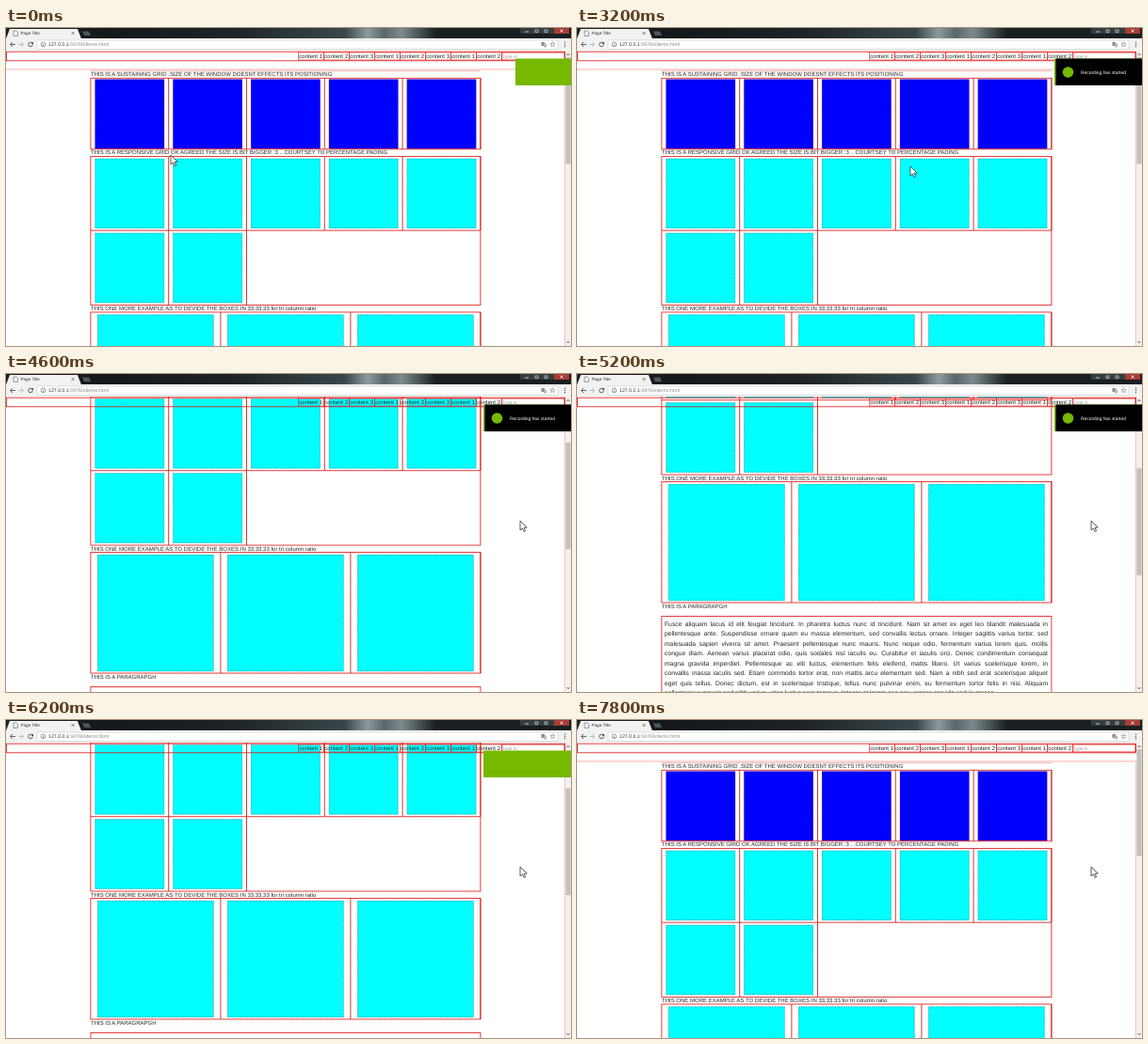
Animation, 600 px wide and 338 px high, one loop 8000 ms. Source, as an HTML page with a canvas:

```html
<!DOCTYPE html>
<html lang="en">
<head>
<meta charset="utf-8">
<title>Page Title</title>
<style>
html, body { margin: 0; width: 100%; height: 100%; overflow: hidden; background: #fff; }
canvas { display: block; }
</style>
</head>
<body>
<canvas id="stage" width="600" height="338"></canvas>
<script>
const ctx = document.getElementById('stage').getContext('2d');
ctx.textRendering = 'geometricPrecision';

const LOOP = 8000, STEP = 200, NOTCH = 37.5;
const RED = '#e01c1c', CYAN = '#00ffff', BLUE = '#0000ff', GREEN = '#76b900';
const LEFT = 89.9, RIGHT = 503.9;

// Keyframes: time, value...
const cursorKeys = [[0, 175, 135], [200, 175, 135], [1200, 281, 103], [1800, 281, 103],
  [3200, 354, 147], [3800, 546, 156]];
const scrollKeys = [[3800, 0], [4600, 112.5], [5400, 187.5], [5600, 187.5], [6600, 37.5], [7000, 0]];
const greenKeys = [[0, 541], [200, 507], [6200, 507], [6400, 600]];
const blackKeys = [[200, 600], [600, 508.5], [5800, 508.5], [6200, 600]];

const paragraph = [
  'Fusce aliquam lacus id elit feugiat tincidunt. In pharetra luctus nunc id tincidunt. Nam sit amet ex eget leo blandit malesuada in',
  'pellentesque ante. Suspendisse ornare quam eu massa elementum, sed convallis lectus ornare. Integer sagittis varius tortor, sed',
  'malesuada sapien viverra sit amet. Praesent pellentesque nunc mauris. Nunc neque odio, fermentum varius lorem quis, mollis',
  'congue diam. Aenean varius placerat odio, quis sodales nisl iaculis eu. Curabitur et iaculis orci. Donec condimentum consequat',
  'magna gravida imperdiet. Pellentesque ac elit luctus, elementum felis eleifend, mattis libero. Ut varius scelerisque lorem, in',
  'convallis massa iaculis sed. Etiam commodo tortor erat, non mattis arcu elementum sed. Nam a nibh sed erat scelerisque aliquet',
  'eget quis tellus. Donec dictum, est in scelerisque tristique, tellus nunc pulvinar enim, eu fermentum tortor felis in nisi. Aliquam',
  'pellentesque mauris sed nibh varius, vitae luctus sem tempus. Integer at lorem nec arcu ornare gravida sed in massa.'
];

function valueAt(keys, t) {
  if (t <= keys[0][0]) return keys[0].slice(1);
  for (let i = 1; i < keys.length; i++) {
    const [a, b] = [keys[i - 1], keys[i]];
    if (t <= b[0]) {
      const p = (t - a[0]) / (b[0] - a[0]);
      return a.slice(1).map((v, j) => v + (b[j + 1] - v) * p);
    }
  }
  return keys[keys.length - 1].slice(1);
}

function fill(x, y, w, h, color) {
  ctx.fillStyle = color;
  ctx.fillRect(x, y, w, h);
}

function path(points, color, width = .85, closed = false) {
  ctx.beginPath();
  points.forEach(([x, y]) => ctx.lineTo(x, y));
  if (closed) ctx.closePath();
  ctx.strokeStyle = color;
  ctx.lineWidth = width;
  ctx.stroke();
}

const line = (x1, y1, x2, y2, color = RED, width = .85) => path([[x1, y1], [x2, y2]], color, width);

function frame(x1, y1, x2, y2, color = RED, width = .85) {
  ctx.strokeStyle = color;
  ctx.lineWidth = width;
  ctx.strokeRect(x1, y1, x2 - x1, y2 - y1);
}

function text(str, x, y, size = 6, color = '#262626') {
  ctx.font = `${size}px "Liberation Sans", Arial, sans-serif`;
  ctx.fillStyle = color;
  ctx.fillText(str, x, y);
}

function disc(x, y, r, color) {
  ctx.beginPath();
  ctx.arc(x, y, r, 0, 7);
  ctx.fillStyle = color;
  ctx.fill();
}

// One row of bordered cells, each holding an inset coloured box.
function row(top, bottom, columns, count, inset, boxTop, boxBottom, color) {
  const cell = (RIGHT - LEFT) / columns;
  for (let i = 0; i < count; i++) {
    const x = LEFT + i * cell, x1 = x + inset, x2 = x + cell - inset;
    fill(x1, boxTop, x2 - x1, boxBottom - boxTop, color);
    ctx.setLineDash([1.5, 1]);
    frame(x1 + .3, boxTop + .3, x2 - .3, boxBottom - .3, 'rgba(170, 40, 60, .65)', .6);
    ctx.setLineDash([]);
    line(x + cell, top, x + cell, bottom, '#c01818');
  }
}

function drawParagraph(y) {
  ctx.font = '6.75px "Liberation Sans", Arial, sans-serif';
  paragraph.forEach((str, i) => {
    const gaps = str.split(' ').length - 1;
    const last = i === paragraph.length - 1;
    ctx.wordSpacing = '0px';
    if (!last) ctx.wordSpacing = (407 - ctx.measureText(str).width) / gaps + 'px';
    text(str, 93, y + i * 10.5, 6.75);
  });
  ctx.wordSpacing = '0px';
}

function drawPage(scroll) {
  ctx.save();
  ctx.beginPath();
  ctx.rect(0, 24, 594, 314);
  ctx.clip();
  ctx.translate(0, -scroll);

  line(0, 44, 594, 44, '#ff9c9c');
  line(593.5, 44, 593.5, 800, '#ffb4b4');
  line(LEFT, 45.7, RIGHT, 45.7, '#dc9c9c', .7);

  text('THIS IS A SUSTAINING GRID .SIZE OF THE WINDOW DOESNT EFFECTS ITS POSITIONING', 90, 51.3);
  row(53, 129, 5, 5, 4.6, 54.5, 128.5, BLUE);
  frame(LEFT, 53.3, RIGHT, 128.8);

  text('THIS IS A RESPONSIVE GRID OK AGREED THE SIZE IS BIT BIGGER :3 .. COURTSEY TO PERCENTAGE PADING', 90, 134.3);
  row(136.5, 215, 5, 5, 4.6, 138.8, 213, CYAN);
  row(215, 294.5, 5, 2, 4.6, 217.8, 292.2, CYAN);
  frame(LEFT, 136.5, RIGHT, 294.5);
  line(LEFT, 215.2, RIGHT, 215.2);

  text('THIS ONE MORE EXAMPLE AS TO DEVIDE THE BOXES IN 33.33.33 for tri column ratio', 90, 300.2);
  row(302, 430.5, 3, 3, 7.3, 304.5, 428.6, CYAN);
  frame(LEFT, 302, RIGHT, 430.5);

  text('THIS IS A PARAGRAPGH', 90, 436.3);
  frame(LEFT, 445, RIGHT, 545);
  drawParagraph(455.3);
  ctx.restore();
}

function drawMenu() {
  frame(.5, 25.2, 593.5, 34.8);
  for (let i = 0; i < 8; i++) {
    const x = 310.3 + i * 27;
    frame(x, 26, x + 27, 34, RED, .6);
    text('content ' + (i % 3 + 1), x + 1, 32);
  }
  fill(527, 26.5, 66, 7, '#fff');
  frame(526.7, 26, 593, 34);
  text('type in', 528, 32, 5, '#999');
}

function drawScrollbar(scroll) {
  fill(594, 24, 6, 314, '#f1f1f1');
  fill(594.5, 31 + scroll * .37, 5, 113.5, '#c1c1c1');
  path([[595.5, 29], [597, 27.3], [598.5, 29]], '#505050', .9);
  path([[595.5, 333], [597, 334.7], [598.5, 333]], '#505050', .9);
}

function drawBrowser() {
  const glass = ctx.createLinearGradient(0, 0, 600, 0);
  [[0, '#1c2224'], [.18, '#14181a'], [.4, '#1d2326'], [.5, '#2c3538'], [.6, '#39464a'],
   [.64, '#8c9a9d'], [.67, '#5a676a'], [.7, '#7d8a8d'], [.76, '#1a2022'], [1, '#1a2022']]
    .forEach(([at, color]) => glass.addColorStop(at, color));
  fill(0, 0, 600, 12, glass);
  fill(0, 11, 600, 13, '#f2f2f2');

  // Tab
  ctx.beginPath();
  [[0, 11.5], [4, 1], [76, 1], [80, 11.5]].forEach(p => ctx.lineTo(...p));
  ctx.fillStyle = '#f2f2f2';
  ctx.fill();
  path([[8, 3], [11, 3], [12.5, 4.5], [12.5, 8.5], [8, 8.5]], '#777', .7, true);
  text('Page Title', 15.5, 7.3, 4.6, '#333');
  line(69.5, 4, 72.5, 7, '#666', .8);
  line(72.5, 4, 69.5, 7, '#666', .8);
  ctx.beginPath();
  [[81, 3.5], [88, 3.5], [90, 8], [83, 8]].forEach(p => ctx.lineTo(...p));
  ctx.fillStyle = '#4d585b';
  ctx.fill();

  // Window buttons
  fill(546, 0, 36, 6, '#343c3f');
  fill(582, 0, 16, 6, '#a83c34');
  line(551, 4, 555, 4, '#ddd');
  frame(562, 2, 565, 4.5, '#ddd', .7);
  frame(572, 2, 575, 4.5, '#ddd', .7);
  line(588.5, 1.5, 591.5, 4.5, '#fff');
  line(591.5, 1.5, 588.5, 4.5, '#fff');

  // Navigation
  path([[7, 15], [4.5, 17.5], [7, 20]], '#555', .9);
  line(4.5, 17.5, 10, 17.5, '#555', .9);
  path([[16, 15], [18.5, 17.5], [16, 20]], '#bbb', .9);
  line(13, 17.5, 18.5, 17.5, '#bbb', .9);
  ctx.beginPath();
  ctx.arc(26, 17.5, 2.3, 0, 5.3);
  ctx.strokeStyle = '#555';
  ctx.stroke();
  fill(27, 15, 2, 2, '#555');

  // Address
  fill(33, 13, 553, 9.5, '#fff');
  frame(33, 13, 586, 22.5, '#ccc', .6);
  ctx.beginPath();
  ctx.arc(39.5, 17.5, 2.3, 0, 7);
  ctx.strokeStyle = '#666';
  ctx.lineWidth = .7;
  ctx.stroke();
  line(39.5, 17, 39.5, 19, '#666', .7);
  const host = '127.0.0.1';
  text(host, 45, 19.3, 5.25, '#333');
  text(':59760/demo.html', 45 + ctx.measureText(host).width, 19.3, 5.25, '#888');
  fill(568.5, 15, 3.5, 4, '#8a8a8a');
  fill(571, 16.5, 3, 4, '#b8b8b8');
  path([0, 1, 2, 3, 4, 5, 6, 7, 8, 9].map(i => {
    const r = i % 2 ? 1.2 : 2.7, a = i * Math.PI / 5;
    return [580.5 + r * Math.sin(a), 17.5 - r * Math.cos(a)];
  }), '#777', .6, true);
  [15.3, 17.5, 19.7].forEach(y => disc(593.5, y, .7, '#555'));
}

function drawBanner(t) {
  const [green] = valueAt(greenKeys, t), [black] = valueAt(blackKeys, t);
  fill(green, 32.5, 600 - green, 28.5, GREEN);
  fill(black, 32.5, 600 - black, 28.5, '#000');
  if (black < 510) {
    disc(521.5, 47, 5.8, GREEN);
    text('Recording has started', 535, 48.8, 4.9, '#fff');
  }
}

function drawCursor(x, y) {
  ctx.save();
  ctx.translate(x, y);
  ctx.beginPath();
  [[0, 0], [0, 10], [2.3, 7.9], [4, 11.5], [5.6, 10.8], [4, 7.3], [7.2, 7.2]]
    .forEach(p => ctx.lineTo(...p));
  ctx.closePath();
  ctx.fillStyle = '#fff';
  ctx.fill();
  ctx.strokeStyle = '#333';
  ctx.lineWidth = .8;
  ctx.stroke();
  ctx.restore();
}

function draw(now) {
  const t = Math.floor(now % LOOP / STEP) * STEP;
  const scroll = Math.round(valueAt(scrollKeys, t)[0] / NOTCH) * NOTCH;
  fill(0, 0, 600, 338, '#fff');
  drawPage(scroll);
  drawMenu();
  drawScrollbar(scroll);
  drawBrowser();
  drawBanner(t);
  drawCursor(...valueAt(cursorKeys, t));
}

const start = performance.now();
function tick() {
  draw(performance.now() - start);
  requestAnimationFrame(tick);
}
tick();
</script>
</body>
</html>
```
